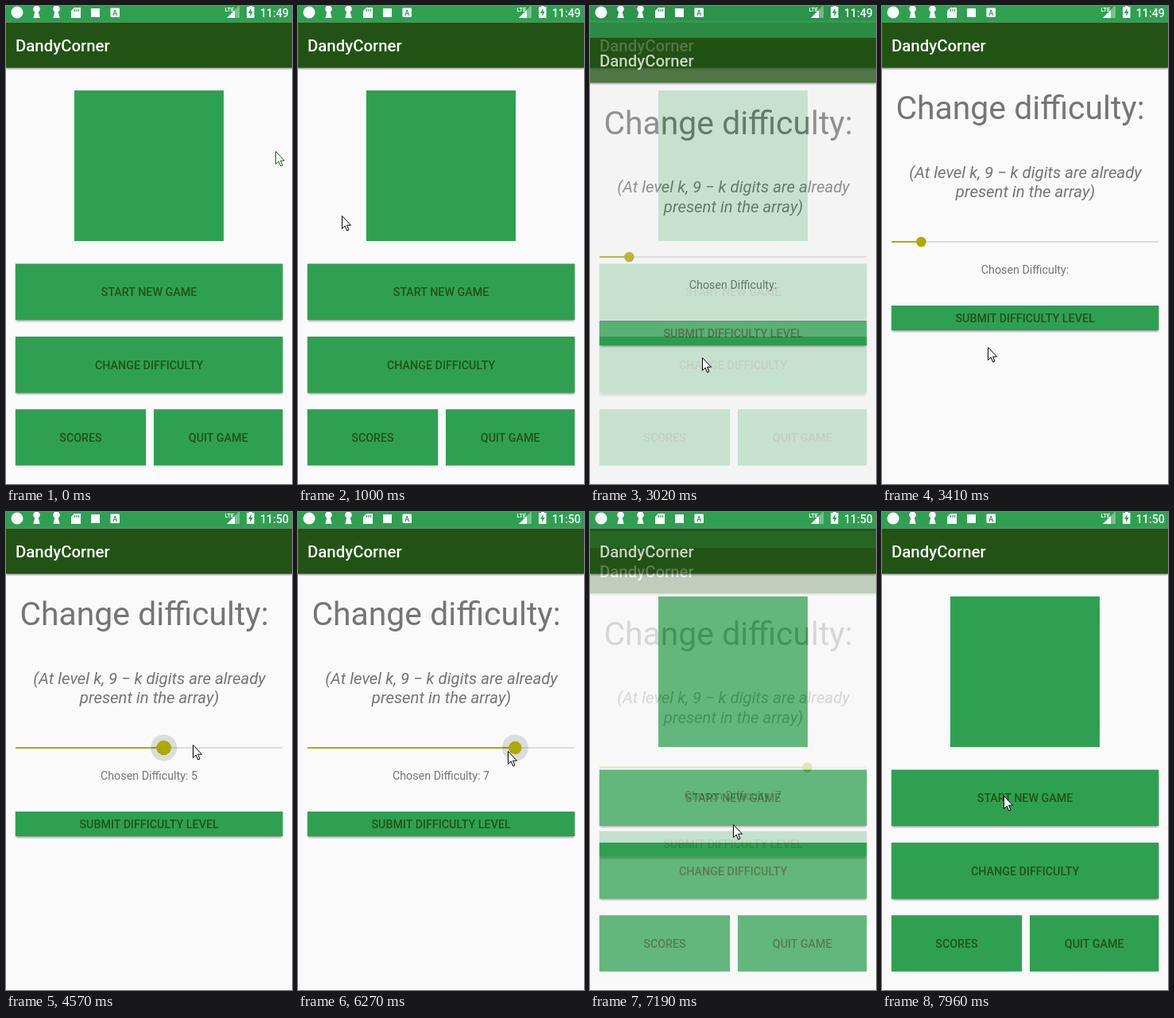
An HTML page for the animation above (8 s loop, 360x600 px).

```html
<!DOCTYPE html>
<html lang="en">
<head>
<meta charset="utf-8">
<title>DandyCorner</title>
<style>
  html, body { margin: 0; width: 100%; height: 100%; overflow: hidden; background: #fafafa; }
  svg { display: block; width: 360px; height: 600px; font-family: Roboto, sans-serif; }
  .title { font-size: 20.4px; font-weight: 500; fill: #fff; }
  .label { font-size: 14.3px; font-weight: 500; fill: #225314; text-anchor: middle; }
  .gray { fill: #757575; text-anchor: middle; }
  .head { font-size: 40.9px; }
  .hint { font-size: 20.4px; font-style: italic; }
  .level { font-size: 14.3px; }
  .clock { font-size: 14.3px; font-weight: 500; }
</style>
</head>
<body>
<svg viewBox="0 0 360 600">
  <defs>
    <filter id="soft" x="-5%" y="-20%" width="110%" height="150%"><feGaussianBlur stdDeviation="1.2"/></filter>
    <g id="frame">
      <rect width="360" height="660" fill="#fafafa"/>
      <rect y="60" width="360" height="19" fill="#000" opacity=".4" filter="url(#soft)"/>
      <rect width="360" height="20.5" fill="#2fa052"/>
      <rect y="20.5" width="360" height="57" fill="#225314"/>
      <text class="title" x="12" y="57">DandyCorner</text>
    </g>
    <path id="keyhole" d="M-2.2 7.4A4.3 4.3 0 1 1 2.2 7.4L4.2 15H-4.2Z"/>
  </defs>

  <g id="home">
    <use href="#frame"/>
    <rect x="86" y="106" width="188" height="189" fill="#2fa052"/>
    <g id="homeButtons"></g>
  </g>
  <rect id="dim" width="360" height="600"/>

  <g id="page">
    <use href="#frame"/>
    <text class="gray head" x="174" y="142">Change difficulty:</text>
    <text class="gray hint" x="180.5" y="215.5">(At level k, 9 − k digits are already</text>
    <text class="gray hint" x="180.5" y="240">present in the array)</text>
    <rect x="12" y="295" width="336" height="2" fill="#dcdcdc"/>
    <rect id="bar" x="12" y="295" height="2" fill="#aaaa14"/>
    <circle id="halo" cy="296" r="16.5"/>
    <circle id="thumb" cy="296" fill="#aaaa00"/>
    <text id="level" class="gray level" x="180" y="336"></text>
    <g id="pageButtons"></g>
  </g>

  <g fill="#fff">
    <circle cx="14" cy="8" r="7.5"/>
    <use href="#keyhole" x="38.5"/>
    <use href="#keyhole" x="63.5"/>
    <path d="M86 2H94V15H82V6Z"/>
    <path d="M86.5 4V7M89 4V7M91.5 4V7" stroke="#2fa052" stroke-width="1.2"/>
    <rect x="107" y="3" width="11" height="11"/>
    <rect x="131.5" y="2.5" width="11.5" height="11.5" rx="1"/>
    <text x="137.2" y="11.5" font-size="9" font-weight="700" text-anchor="middle" fill="#2fa052">A</text>
    <path d="M278 15L294 -1V15Z" opacity=".35"/>
    <path d="M278 15L288 5V15Z"/>
    <text x="275.5" y="7" font-size="7" font-weight="700">LTE</text>
    <path d="M303 1H306V-1H310V1H312.5V15H303Z"/>
    <path d="M308.6 3L305 9H307.3V13L310.7 7H308.6Z" fill="#2fa052"/>
    <text id="clock" class="clock" x="356" y="13.5" text-anchor="end"></text>
  </g>
  <path id="cursor" d="M.5 .5V16.5L4.2 13L6.7 19L9 18L6.5 12.2H11.5Z" fill="#fff" stroke-linejoin="round"/>
</svg>
<script>
const $ = id => document.getElementById(id);
const LOOP = 8000, STEP = 77.15;
const OPEN = 2958, CLOSE = 6972, GRAB = 4180, RELEASE = 6190;
const TRACK = 12, NOTCH = 336 / 9;

const clamp = v => Math.max(0, Math.min(1, v));
const ramp = (t, start, length) => clamp((t - start) / length);
const linear = k => k;
const smooth = k => k * k * (3 - 2 * k);
const easeOut = power => k => 1 - (1 - k) ** power;

function set(el, attrs) {
  for (const name in attrs) el.setAttribute(name, attrs[name]);
}

function button(parent, x, y, w, h, text, raised) {
  const shade = raised
    ? `<rect class="shade" x="${x + 1}" y="${y + 4}" width="${w - 2}" height="${h - 2.5}" opacity=".4" filter="url(#soft)"/>` : '';
  $(parent).insertAdjacentHTML('beforeend', `<g>${shade}
    <rect x="${x}" y="${y}" width="${w}" height="${h}" fill="#2fa052"/>
    <text class="label" x="${x + w / 2}" y="${y + h / 2 + 5.6}">${text}</text></g>`);
  return $(parent).lastElementChild.querySelector('.shade');
}
button('homeButtons', 11.8, 323.5, 336.6, 70.5, 'START NEW GAME', true);
const changeShade = button('homeButtons', 11.8, 415, 336.6, 70.5, 'CHANGE DIFFICULTY', true);
button('homeButtons', 11.8, 506.2, 164.4, 70.6, 'SCORES');
button('homeButtons', 186, 506.2, 162.4, 70.6, 'QUIT GAME');
const submitShade = button('pageButtons', 11.8, 376, 336.6, 31, 'SUBMIT DIFFICULTY LEVEL', true);

// Pointer moves; "bend" is the control point of a curved one
const home = [339, 182];
const moves = [
  { at: 163, length: 880, to: [33, 253], bend: [345, 395], ease: linear },
  { at: 1400, length: 690, to: [141, 441], ease: linear },
  { at: 3326, length: 854, to: [50, 292], ease: linear },
  { at: GRAB, length: 850, to: [272, 292], ease: easeOut(3) },
  { at: RELEASE, length: 380, to: [180, 392], ease: smooth },
  { at: 7570, length: 385, to: [153, 356], ease: smooth }
];

function pointer(t) {
  let pos = home;
  for (const { at, length, to, bend, ease } of moves) {
    if (t < at) break;
    const k = ease(ramp(t, at, length));
    pos = pos.map((from, i) => {
      const mid = bend ? bend[i] : (from + to[i]) / 2;
      return (1 - k) ** 2 * from + 2 * k * (1 - k) * mid + k * k * to[i];
    });
  }
  return pos;
}

// The page slides 48px and fades while the screen below is dimmed
function pageState(t) {
  const dt = t - CLOSE;
  if (dt < 0) return {
    shift: 48 * (1 - ramp(t, OPEN, 350)) ** 5,
    alpha: easeOut(4)(ramp(t, OPEN, 200)),
    dim: .3 * ramp(t, OPEN, 217)
  };
  return {
    shift: 48 * ramp(dt, 0, 250) ** 4,
    alpha: 1 - ramp(dt, 100, 150),
    dim: .3 * (1 - ramp(dt, 0, 217))
  };
}

function press(shade, t, start) {
  const k = ramp(t, start, 220) * (1 - ramp(t, start + 600, 100));
  set(shade, { transform: `translate(0 ${2 * k})`, opacity: .4 + .05 * k });
}

function draw(time) {
  // The screen refreshes in fixed steps
  const t = Math.max(0, 240 + STEP * Math.floor((time - 225) / STEP));
  const [x, y] = pointer(t);
  set($('cursor'), {
    transform: `translate(${Math.round(x)} ${Math.round(y)})`,
    stroke: time < 70 ? '#225314' : '#000'
  });

  const { shift, alpha, dim } = pageState(t);
  set($('page'), { transform: `translate(0 ${shift})`, opacity: alpha });
  set($('dim'), { opacity: dim });

  // The slider trails the pointer by one step
  const held = Math.min(t - STEP, RELEASE);
  const level = held < GRAB ? 1 : Math.max(1, Math.round((pointer(held)[0] - TRACK) / NOTCH));
  const cx = TRACK + level * NOTCH;
  set($('bar'), { width: cx - TRACK });
  set($('thumb'), { cx, r: 6.3 + 3 * (ramp(t, GRAB, 220) - ramp(t, RELEASE, 180)) });
  set($('halo'), { cx, opacity: .12 * (ramp(t, GRAB - 100, 100) - ramp(t, RELEASE + 70, 240)) });
  $('level').textContent = 'Chosen Difficulty:' + (level > 1 ? ' ' + level : '');
  $('clock').textContent = t < 3790 ? '11:49' : '11:50';

  press(changeShade, t, 2620);
  press(submitShade, t, 6710);
}

function tick() {
  draw(performance.now() % LOOP);
  requestAnimationFrame(tick);
}
tick();
</script>
</body>
</html>
```
